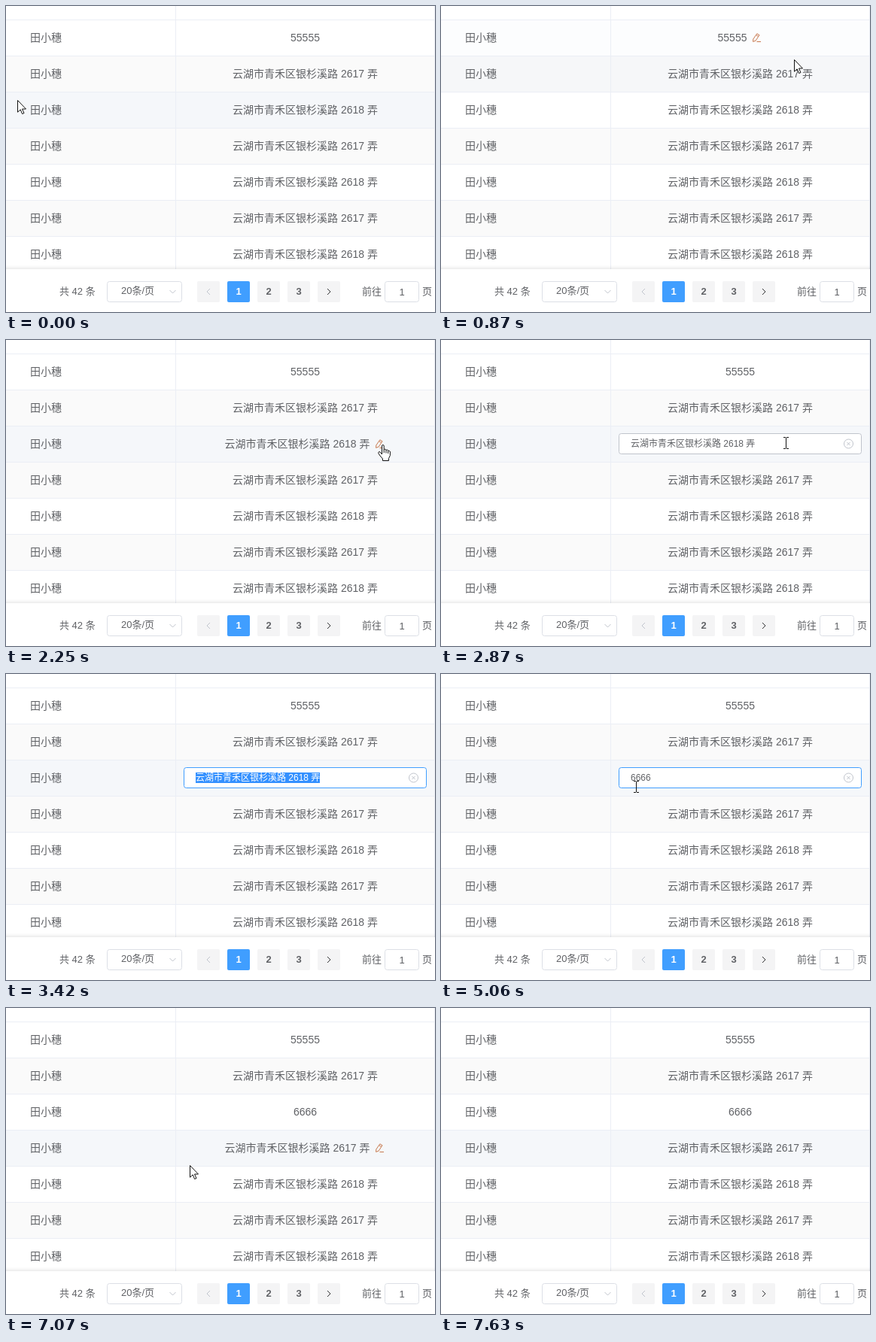
An HTML page with a canvas for the animation above (8000 ms loop, 570x407 px).

```html
<!DOCTYPE html>
<html lang="zh-CN">
<head>
<meta charset="utf-8">
<style>
  html, body { margin: 0; width: 100%; height: 100%; overflow: hidden; background: #fff; }
  canvas { display: block; }
</style>
</head>
<body>
<canvas id="stage" width="570" height="407"></canvas>
<script>
const ctx = document.getElementById('stage').getContext('2d', { alpha: false });
const LOOP = 8000, TICK = 80, FADE = 250, PEN_LAG = 200;
const TOP = 18, ROW = 48, SPLIT = 225, CENTER = 397.5;
const FONT = '"Liberation Sans", "Noto Sans CJK SC", "Noto Sans CJK", sans-serif';
const INK = '#606266', MUTED = '#c0c4cc', BLUE = '#409eff', LINE = '#ebeef5', BORDER = '#dcdfe6';
const NAME = '田小穗';
const address = n => `云湖市青禾区银杉溪路 ${n} 弄`;
const OLD_VALUE = address(2618), NEW_VALUE = '6666';
const EDIT_ROW = 2;
const OPEN = 2420, FOCUS = 3040, SELECTED = 3270, TYPING = 4040, KEY_GAP = 160, CARET_OFF = 5060, COMMIT = 5440;

// Each glide runs from where the last one stopped through its key points.
const glides = [];
function glide(start, end, shape, ...points) {
  const from = glides.length ? glides.at(-1).path.at(-1) : points[0];
  glides.push({ start, end, shape, path: [from, ...points] });
}
glide(0, 0, 'arrow', [15, 125]);
glide(150, 150, 'arrow', [15, 123]);
glide(300, 1100, 'arrow', [270, 50], [440, 67], [472, 71.4], [493, 114]);
glide(1250, 1320, 'arrow', [495, 114]);
glide(1500, 1550, 'arrow', [495, 113]);
glide(1780, 2030, 'arrow', [499, 121], [498, 151]);
glide(2250, 2250, 'hand', [494, 139]);
glide(2570, 2570, 'beam', [500, 140]);
glide(2740, 2870, 'beam', [458, 137]);
glide(FOCUS, SELECTED, 'beam', [256, 149]);
glide(3420, 3420, 'none', [259, 150]);
glide(CARET_OFF, CARET_OFF, 'beam', [259, 150]);
glide(5210, 5210, 'none', [259, 150]);
glide(COMMIT, COMMIT, 'hand', [258, 149]);
glide(6450, 6920, 'arrow', [305, 185], [300, 203]);
glide(7070, 7630, 'arrow', [150, 219], [60, 200], [11, 203]);
glide(7630, 7630, 'none', [11, 203]);

// The pointer advances in equal steps, about one per tick.
function cursorAt(t) {
  const { start, end, shape, path } = glides.findLast(g => g.start <= Math.max(0, t));
  const gaps = Math.round((end - start) / TICK);
  const step = gaps ? Math.min(gaps, Math.floor((t - start) / (end - start) * gaps)) : 0;
  const place = (step + 1) / (gaps + 1) * (path.length - 1);
  const i = Math.min(path.length - 2, Math.floor(place));
  const [x, y] = path[i].map((v, axis) => Math.round(v + (path[i + 1][axis] - v) * (place - i)));
  return { shape, x, y };
}

const rowAt = t => Math.floor((cursorAt(t).y - TOP - 1) / ROW);
const penRow = t => cursorAt(t - PEN_LAG).x > SPLIT ? rowAt(t - PEN_LAG) : -1;

// A linear fade equals the share of the last FADE ms spent on each row.
function hoverShares(t, samples = 25) {
  const shares = {};
  for (let i = 1; i <= samples; i++) {
    const row = rowAt(t - i * FADE / samples);
    shares[row] = (shares[row] || 0) + 1 / samples;
  }
  return shares;
}

function rect(x, y, w, h, color) {
  ctx.fillStyle = color;
  ctx.fillRect(x, y, w, h);
}

function text(str, x, y, { size = 14, color = INK, align = 'left', weight = '' } = {}) {
  ctx.font = `${weight} ${size}px ${FONT}`;
  ctx.textAlign = align;
  ctx.fillStyle = color;
  ctx.fillText(str, x, y);
}

function box(x, y, w, h, fill, stroke) {
  const inset = stroke ? 0.5 : 0;
  ctx.beginPath();
  ctx.roundRect(x + inset, y + inset, w - 2 * inset, h - 2 * inset, stroke ? 3 : 2);
  ctx.fillStyle = fill;
  ctx.fill();
  if (stroke) {
    ctx.lineWidth = 1;
    ctx.strokeStyle = stroke;
    ctx.stroke();
  }
}

function shape(d, x, y, { fill, stroke }) {
  const path = new Path2D(d);
  ctx.save();
  ctx.translate(x, y);
  ctx.lineWidth = 1;
  ctx.lineJoin = 'round';
  if (fill) { ctx.fillStyle = fill; ctx.fill(path); }
  if (stroke) { ctx.strokeStyle = stroke; ctx.stroke(path); }
  ctx.restore();
}

function drawPen(x, y, edited) {
  const color = edited ? '#cf4a42' : '#c8794f';
  shape('M6.8 .8L10 2.7L5 10.2L1.6 11.4L1.8 8ZM5.6 2.6L8.8 4.5', x, y, { stroke: color });
  shape('M6.5 11.5H12', x, y, { stroke: edited ? '#303133' : color });
}

function drawCell(row, t) {
  const edited = row === EDIT_ROW && t >= COMMIT;
  const value = row === 0 ? '55555' : edited ? NEW_VALUE : address(row % 2 ? 2617 : 2618);
  const withPen = penRow(t) === row;
  const x = CENTER - (withPen ? 10.5 : 0), top = TOP + row * ROW;
  text(value, x, top + 29, { align: 'center' });
  if (withPen) drawPen(Math.round(x + ctx.measureText(value).width / 2 + 7), top + 18, edited);
}

function drawInput(t, cursorX) {
  box(236, 124, 323, 28, '#fff', t < FOCUS ? MUTED : BLUE);
  const typed = t >= TYPING;
  const value = typed ? NEW_VALUE.slice(0, 1 + Math.floor((t - TYPING) / KEY_GAP)) : OLD_VALUE;
  text(value, 252, 142, { size: 12 });
  const end = Math.round(252 + ctx.measureText(value).width);
  if (t >= FOCUS && !typed) {
    const from = t >= SELECTED ? 252 : Math.min(cursorX, end);
    ctx.save();
    ctx.beginPath();
    ctx.rect(from, 131, end - from, 14);
    ctx.clip();
    rect(from, 131, end - from, 14, '#3390ff');
    text(value, 252, 142, { size: 12, color: '#fff' });
    ctx.restore();
  }
  if (typed && t < CARET_OFF) rect(end, 131, 1, 14, '#303133');
  shape('M6 0A6 6 0 1 1 -6 0A6 6 0 1 1 6 0M-2.2 -2.2L2.2 2.2M2.2 -2.2L-2.2 2.2', 541.5, 138, { stroke: MUTED });
}

function drawTable(t, cursorX) {
  const shares = hoverShares(t);
  for (let row = -1; row < 7; row++) {
    const top = TOP + row * ROW;
    rect(0, top, 570, ROW, row % 2 === 1 ? '#fafafa' : '#fff');
    ctx.globalAlpha = Math.min(1, shares[row] || 0);
    rect(0, top, 570, ROW, '#f5f7fa');
    ctx.globalAlpha = 1;
    rect(0, top, 570, 1, LINE);
    if (row < 0) continue;
    text(NAME, 32, top + 29);
    if (row === EDIT_ROW && t >= OPEN && t < COMMIT) drawInput(t, cursorX);
    else drawCell(row, t);
  }
  rect(SPLIT, 0, 1, 350, LINE);
  rect(569, 0, 1, 350, LINE);
}

function drawPager() {
  const label = { size: 13 };
  ctx.save();
  ctx.shadowColor = 'rgba(0,0,0,.17)';
  ctx.shadowBlur = 6;
  rect(-10, 350, 590, 70, '#fff');
  ctx.restore();
  text('共 42 条', 71, 384, label);
  box(134, 366, 100, 28, '#fff', BORDER);
  text('20条/页', 153, 383, label);
  shape('M-4 -2L0 2L4 -2', 221.5, 380, { stroke: MUTED });
  for (let i = 0; i < 5; i++) {
    const x = 254 + i * 40, active = i === 1;
    box(x, 366, 30, 28, active ? BLUE : '#f4f4f5');
    if (i === 0) shape('M2 -4L-2 0L2 4', x + 15, 380, { stroke: MUTED });
    else if (i === 4) shape('M-2 -4L2 0L-2 4', x + 15, 380, { stroke: '#303133' });
    else text(i, x + 15, 384, { size: 13, weight: 'bold', align: 'center', color: active ? '#fff' : INK });
  }
  text('前往', 473, 384, label);
  box(503, 366, 46, 28, '#fff', BORDER);
  text('1', 526, 385, { size: 13, align: 'center' });
  text('页', 553, 384, label);
}

function drawCursor({ shape: kind, x, y }) {
  const outline = { fill: '#fff', stroke: '#111' };
  if (kind === 'arrow') {
    shape('M.5 .5V16.2L4.2 12.8L6.6 18.5L9 17.5L6.5 12H11.5Z', x, y, outline);
  } else if (kind === 'beam') {
    shape('M-3.5 -7.5H-.5M.5 -7.5H3.5M0 -7V7M-3.5 7.5H-.5M.5 7.5H3.5', x + .5, y, { stroke: '#111' });
  } else if (kind === 'hand') {
    shape('M5.5 13V2Q5.5 .5 6.8 .5T8.2 2V7.5Q8.4 6 9.7 6.2T11 7.8Q11.4 6.8 12.5 7T13.7 8.7' +
      'Q14.2 8 15.3 8.4T16.4 10V14.5L14.5 18.5V21.5H6.5V19L3 15L.8 11.5Q.5 10 1.8 9.7T4 11.2Z', x, y, outline);
    shape('M8.2 7.5V11M11 8V11.5M13.7 9V12', x, y, { stroke: '#111' });
  }
}

function frame(now) {
  const t = now % LOOP, cursor = cursorAt(t);
  drawTable(t, cursor.x);
  drawPager();
  drawCursor(cursor);
  requestAnimationFrame(frame);
}
requestAnimationFrame(frame);
</script>
</body>
</html>
```
